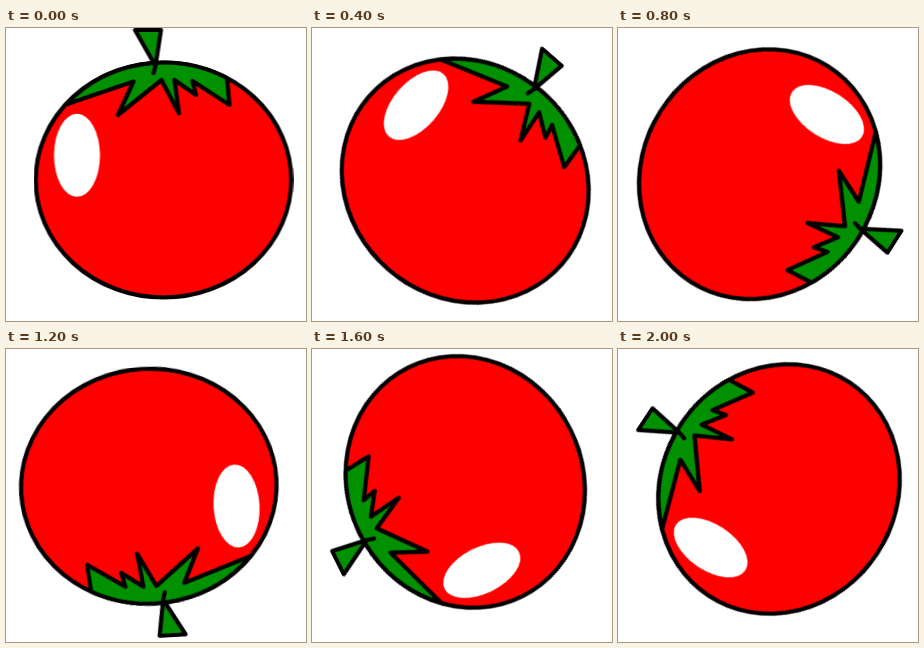
An HTML page that plays this animation: 300 px wide and 293 px high, repeating every 2400 ms.

```html
<!DOCTYPE html>
<html lang="en">
<head>
<meta charset="utf-8">
<title>Rolling tomato</title>
<style>
  html, body { margin: 0; width: 100%; height: 100%; overflow: hidden; background: #fff; }
  svg { display: block; width: 100%; height: 100%; }
  .outline { stroke: #000; stroke-width: 4.2; stroke-linejoin: round; stroke-linecap: round; }
  .green { fill: #009000; }

  /* The tomato is drawn around its own centre and turns in hard steps. */
  .tomato { animation: roll 2400ms step-end infinite; }
  @keyframes roll {
    0%       { transform: translate(157.5px, 152px) rotate(0deg); }
    16.6667% { transform: translate(153.2px, 152.6px) rotate(41deg); }
    33.3333% { transform: translate(141.6px, 146.2px) rotate(122.5deg); }
    50%      { transform: translate(142.8px, 137.2px) rotate(176.8deg); }
    66.6667% { transform: translate(153.3px, 132.9px) rotate(243.5deg); }
    83.3333% { transform: translate(161px, 140px) rotate(303.5deg); }
    100%     { transform: translate(157.5px, 152px) rotate(0deg); }
  }
</style>
</head>
<body>
<svg viewBox="0 0 300 293" preserveAspectRatio="none">
  <g class="tomato">
    <ellipse class="outline" rx="127.8" ry="117.5" fill="#f00"/>
    <path class="outline green" d="M-97.5-75.5 A127.8 117.5 0 0 1 63.5-102 L66-75 29-99
      32.5-85 11-100 15.5-66.5 -2-100 -45.5-65 -30-98.5Z"/>
    <path class="outline green" d="M-28.5-150 L-2.5-150 -8-114Z M-8-114 L-10-107"/>
    <ellipse cx="-86.5" cy="-24.7" rx="23" ry="41.5" fill="#fff"/>
  </g>
</svg>
</body>
</html>
```
